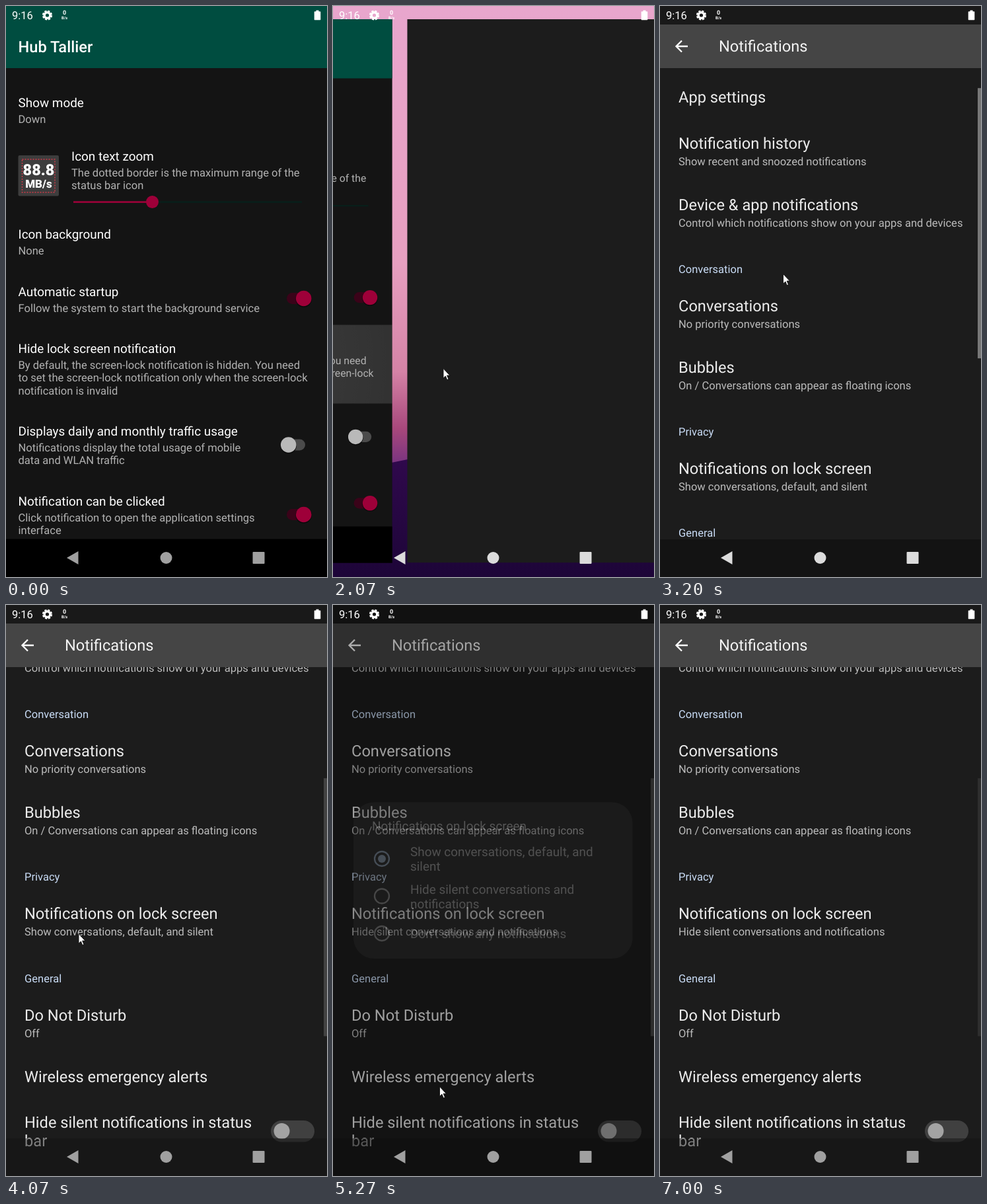
An HTML page for the animation above (7070 ms loop, 486 px wide and 864 px high).

```html
<!DOCTYPE html>
<html lang="en">
<head>
<meta charset="utf-8">
<title>Hub Tallier</title>
<style>
  html, body { margin: 0; width: 100%; height: 100%; overflow: hidden; background: #000; }
  svg { display: block; width: 486px; height: 864px; }
  text { font-family: Roboto, sans-serif; white-space: pre; text-rendering: geometricPrecision; }
</style>
</head>
<body>
<svg id="stage" viewBox="0 0 486 864" xmlns="http://www.w3.org/2000/svg">
  <defs>
    <linearGradient id="sky" x2="0" y2="1">
      <stop offset="0" stop-color="#e8a6cd"/>
      <stop offset=".45" stop-color="#e79fc0"/>
      <stop offset=".64" stop-color="#d583a6"/>
      <stop offset=".74" stop-color="#a8487c"/>
      <stop offset=".8" stop-color="#7a3480"/>
    </linearGradient>
    <linearGradient id="hill" x2="0" y2="1">
      <stop offset="0" stop-color="#32094f"/>
      <stop offset="1" stop-color="#1d0538"/>
    </linearGradient>
    <radialGradient id="glow">
      <stop offset="0" stop-color="#fff" stop-opacity=".19"/>
      <stop offset=".45" stop-color="#fff" stop-opacity=".11"/>
      <stop offset="1" stop-color="#fff" stop-opacity="0"/>
    </radialGradient>
    <clipPath id="row"><rect y="486" width="486" height="125"/></clipPath>
  </defs>
  <rect width="486" height="864" fill="url(#sky)"/>
  <path d="M0 702Q60 698 113 686T260 660T486 690V864H0Z" fill="url(#hill)"/>
  <g id="app"></g>
  <g id="settings"></g>
  <rect id="dim" width="486" height="864"/>
  <g id="dialog"></g>
  <g id="system"></g>
  <path id="cursor" d="M.5.5V15.2L3.9 12L6.2 17.6L8.5 16.6L6.1 11.1H10.4Z" fill="#fff" stroke="#111" stroke-width=".9"/>
</svg>
<script>
const LOOP = 7070, FRAME = 200 / 3, W = 486, H = 864;
const $ = id => document.getElementById(id);

// Markup helpers
const text = (x, y, size, str, fill = '#fff', more = '') =>
  `<text x="${x}" y="${y}" font-size="${size}" fill="${fill}" ${more}>${str}</text>`;
const rect = (x, y, w, h, fill, more = '') =>
  `<rect x="${x}" y="${y}" width="${w}" height="${h}" fill="${fill}" ${more}/>`;
const disc = (x, y, r, fill, more = '') =>
  `<circle cx="${x}" cy="${y}" r="${r}" fill="${fill}" ${more}/>`;

const BIG = 23.65, MID = 18.92, SMALL = 16.55, LEAD = 19.4;
const MUTED = '#b2b2b2', ACCENT = '#9e0039';

function pref(x, y, title, ...lines) {
  return text(x, y, MID, title) +
    lines.map((s, i) => text(x, Math.round(y + 24 + i * LEAD), SMALL, s, MUTED)).join('');
}

function toggle(y, on) {
  return rect(on ? 425 : 416, y - 8.5, 37, 17, on ? '#3a0319' : '#4b4b4b', 'rx="8.5"') +
    disc(on ? 450.7 : 427.7, y + 1, 12.2, '#0a0a0a') +
    disc(on ? 450.7 : 427.7, y, 11.8, on ? ACCENT : '#b9b9b9');
}

$('app').innerHTML =
  rect(0, 0, W, H, '#141414') +
  '<g clip-path="url(#row)"><circle id="ripple" cx="180" cy="548" r="0" fill="url(#glow)"/></g>' +
  rect(0, 0, W, 94, '#004d40') +
  text(18.5, 70, BIG, 'Hub Tallier', '#fff', 'font-weight="500"') +
  pref(18.5, 153, 'Show mode', 'Down') +
  rect(18.5, 226, 61.5, 61.5, '#3d3d3d', 'rx="2"') +
  rect(24.5, 232, 49.5, 50, 'none', 'stroke="#d23a48" stroke-width="1.4" stroke-dasharray="2 2"') +
  text(49.5, 255.5, 23.4, '88.8', '#fff', 'font-weight="900" text-anchor="middle"') +
  text(49.5, 274.5, 17, 'MB/s', '#fff', 'font-weight="900" text-anchor="middle"') +
  pref(99, 234, 'Icon text zoom', 'The dotted border is the maximum range of the', 'status bar icon') +
  rect(102, 295.5, 346, 2.2, '#07201b') +
  rect(102, 295.3, 120, 2.6, ACCENT) +
  disc(221.5, 296.5, 9.5, ACCENT) +
  pref(18.5, 352, 'Icon background', 'None') +
  pref(18.5, 439, 'Automatic startup', 'Follow the system to start the background service') +
  toggle(442.5, true) +
  pref(18.5, 525, 'Hide lock screen notification',
    'By default, the screen-lock notification is hidden. You need',
    'to set the screen-lock notification only when the screen-lock',
    'notification is invalid') +
  pref(18.5, 650, 'Displays daily and monthly traffic usage',
    'Notifications display the total usage of mobile', 'data and WLAN traffic') +
  toggle(664, false) +
  pref(18.5, 756, 'Notification can be clicked',
    'Click notification to open the application settings', 'interface') +
  toggle(769.5, true) +
  rect(0, 806.5, W, 58, '#000');

const entry = (y, title, sub, id = '') =>
  text(28, y + 8.2, BIG, title, '#ececec') +
  (sub ? text(28, y + 33, SMALL, sub, '#bcbcbc', id) : '');
const section = (y, title) => text(28, y + 6, SMALL, title, '#c9dcf6');

// List positions are those at the end of the scroll.
$('settings').innerHTML =
  rect(0, 0, W, H, '#1c1c1c') +
  '<g id="content"><g id="list">' +
  rect(0, 431, W, 92, '#fff', 'id="press"') +
  section(-151, 'Manage') +
  entry(-95, 'App settings') +
  entry(-25, 'Notification history', 'Show recent and snoozed notifications') +
  entry(68, 'Device &amp; app notifications', 'Control which notifications show on your apps and devices') +
  section(165, 'Conversation') +
  entry(221, 'Conversations', 'No priority conversations') +
  entry(314, 'Bubbles', 'On / Conversations can appear as floating icons') +
  section(411, 'Privacy') +
  entry(467, 'Notifications on lock screen', ' ', 'id="choice"') +
  section(564.5, 'General') +
  entry(620.5, 'Do Not Disturb', 'Off') +
  entry(713.5, 'Wireless emergency alerts') +
  entry(783, 'Hide silent notifications in status') +
  entry(811, 'bar') +
  rect(401, 780, 66, 32.5, '#404040', 'rx="16.2"') +
  disc(417.5, 796, 12, '#a3a3a3') +
  '</g>' +
  rect(481, 0, 5, 390, '#fff', 'id="bar"') +
  rect(0, 0, W, 28, '#191919') +
  rect(0, 28, W, 66, '#454545') +
  '<path d="M42 61H25M33 52.5L24.5 61L33 69.5" fill="none" stroke="#fff" stroke-width="2.3"/>' +
  text(89, 69, BIG, 'Notifications', '#f2f2f2') +
  rect(0, 807, W, 57, '#131313', 'id="shade"') +
  '</g>';

function option(y, lines, selected) {
  const color = selected ? '#b9d2f0' : '#c0c0c0';
  const top = y + 7 - (lines.length - 1) * 11;
  return disc(74, y, 11, 'none', `stroke="${color}" stroke-width="2.3"`) +
    (selected ? disc(74, y, 6, color) : '') +
    lines.map((s, i) => text(117, top + i * 22, MID, s, '#dedede')).join('');
}

$('dialog').innerHTML =
  rect(31, 298.5, 422.5, 236.5, '#2e2e2e', 'rx="31"') +
  text(59, 341, MID, 'Notifications on lock screen', '#ececec') +
  option(384, ['Show conversations, default, and', 'silent'], true) +
  option(440.5, ['Hide silent conversations and', 'notifications']) +
  option(497, ['Don’t show any notifications']);

$('system').innerHTML =
  text(9, 20, SMALL, '9:16') +
  disc(62.5, 14, 4.3, 'none', 'stroke="#fff" stroke-width="3.4"') +
  disc(62.5, 14, 6.4, 'none', 'stroke="#fff" stroke-width="2.4" stroke-dasharray="3.2 1.826"') +
  text(88.5, 13, 9, '0', '#fff', 'font-weight="700" text-anchor="middle"') +
  text(88.5, 19.5, 6, 'B/s', '#fff', 'font-weight="700" text-anchor="middle"') +
  '<path d="M469.5 6.5h4v1.8h2q.8 0 .8.8v11.3q0 .8-.8.8h-8q-.8 0-.8-.8V9.1q0-.8.8-.8h2z" fill="#fff"/>' +
  '<g id="nav"><path d="M92 835L109.5 825V845Z"/><circle cx="242.5" cy="835" r="9"/>' +
  '<rect x="373.5" y="826" width="18" height="18" rx="1"/></g>';

// Motion helpers
const clamp = u => Math.min(1, Math.max(0, u));
const span = (t, from, length) => clamp((t - from) / length);

function track(t, steps, k = 1) {
  if (t <= steps[0][0]) return steps[0][k];
  for (let i = 1; i < steps.length; i++) {
    const a = steps[i - 1], b = steps[i];
    if (t < b[0]) return a[k] + (b[k] - a[k]) * (t - a[0]) / (b[0] - a[0]);
  }
  return steps[steps.length - 1][k];
}

const bezier = (x1, y1, x2, y2) => u => {
  const curve = (s, a, b) => 3 * a * s * (1 - s) ** 2 + 3 * b * s * s * (1 - s) + s ** 3;
  let lo = 0, hi = 1;
  for (let i = 0; i < 24; i++) {
    const mid = (lo + hi) / 2;
    if (curve(mid, x1, x2) < u) lo = mid; else hi = mid;
  }
  return curve(lo, y1, y2);
};
const slide = bezier(.2, 0, 0, 1), zoom = bezier(.4, 0, .2, 1);

const POINTER = [
  [200, 480, 673], [330, 355, 640], [470, 215, 575], [600, 166.5, 548],
  [2535, 166.5, 548], [2867, 191, 695], [3010, 191, 695], [3200, 186, 405],
  [3333, 180, 410], [3733, 112, 481], [3800, 109.5, 497], [4200, 109.5, 497],
  [4600, 165, 441], [5133, 165, 441], [5267, 161, 729], [5467, 134, 844],
  [5667, 134, 844], [5733, 133, 845], [5933, 133, 845], [6000, 126, 848]
];
const BAR = [
  [3067, 0], [3133, .4], [3933, .4], [4000, .28], [4067, .17],
  [6800, .17], [6867, .14], [7000, .08]
];
const DIM = [[4267, 0], [4667, .6], [5150, .6], [5400, 0]];
const DIALOG = [[4267, 0], [4533, 1], [5150, 1], [5317, 0]];
const PRESS = [[4133, 0], [4267, .1], [4600, .1], [4870, 0]];
const NAV = [[1867, 160], [1933, 220], [3267, 220], [3600, 160]];
const SHADE = [[3267, 1], [3600, .5]];
const OPEN = 1898;

function draw(t) {
  const p = slide(span(t, OPEN, 433));
  const s = 1 - .0515 * (zoom(span(t, OPEN, 240)) - zoom(span(t, OPEN + 283, 317)));
  const place = (id, x) => $(id).setAttribute('transform',
    `translate(${243 + x * s} ${432 - 18 * (1 - s)}) scale(${s}) translate(-243 -432)`);
  place('app', -510 * p);
  place('settings', 510 * (1 - p));
  $('settings').style.display = t < OPEN ? 'none' : '';
  $('content').style.display = t < 2190 ? 'none' : '';
  $('ripple').setAttribute('r', t < 1795 ? 0 : 78 + (t - 1800) * 3);

  const scroll = 284 * (1 - (1 - span(t, 3150, 580)) ** 2.2);
  $('list').setAttribute('transform', `translate(0 ${284 - scroll})`);
  $('bar').setAttribute('y', 94 + .592 * scroll);
  $('bar').setAttribute('height', 413 - .08 * scroll);
  $('bar').setAttribute('opacity', track(t, BAR));
  $('press').setAttribute('opacity', track(t, PRESS));
  $('choice').textContent = t < 5190
    ? 'Show conversations, default, and silent' : 'Hide silent conversations and notifications';

  $('dim').setAttribute('opacity', track(t, DIM));
  $('dialog').setAttribute('opacity', track(t, DIALOG));
  $('shade').setAttribute('opacity', track(t, SHADE));
  const grey = Math.round(track(t, NAV));
  $('nav').setAttribute('fill', `rgb(${grey},${grey},${grey})`);

  $('cursor').style.display = t >= 199 && t < 6060 ? '' : 'none';
  $('cursor').setAttribute('transform', `translate(${track(t, POINTER)} ${track(t, POINTER, 2)})`);
}

// The picture advances 15 times per second.
function tick() {
  const t = performance.now() % LOOP;
  draw(Math.floor((t + 4) / FRAME) * FRAME);
  requestAnimationFrame(tick);
}
tick();
</script>
</body>
</html>
```
